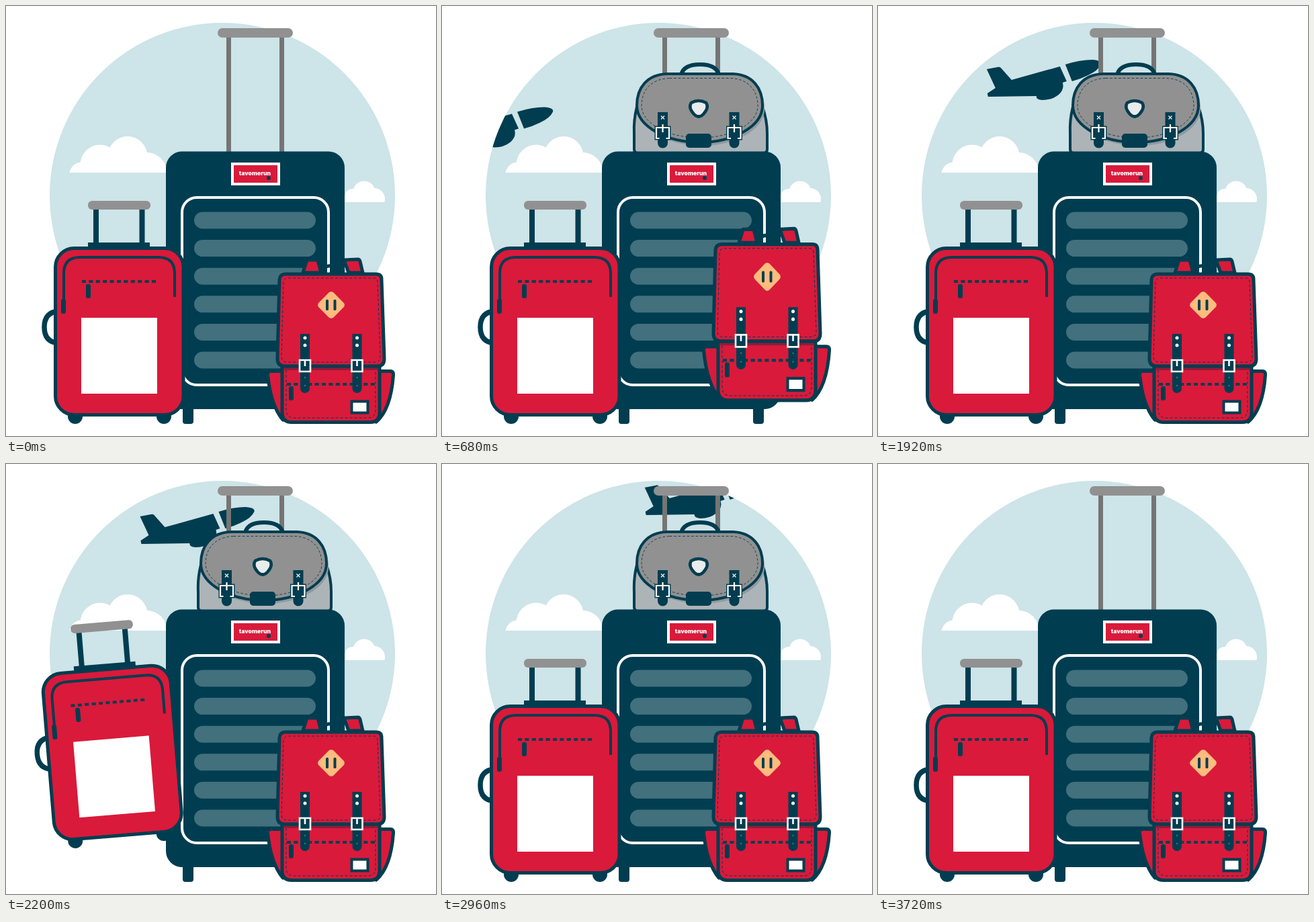
An HTML page that plays this animation: 640 by 640 pixels, repeating every 4 s.

```html
<!DOCTYPE html>
<html lang="en">
<head>
<meta charset="utf-8">
<title>Luggage</title>
<style>
  html, body { margin: 0; width: 100%; height: 100%; overflow: hidden; background: #fff; }
  svg { display: block; width: 100%; height: 100%; }
  .navy { fill: #003d50; }
  .red { fill: #d91a3b; }
  .white { fill: #fff; }
  .line { fill: none; stroke: #003d50; }
  .edge { stroke: #003d50; stroke-width: 5; stroke-linejoin: round; }
  .stitch { fill: none; stroke: #003d50; stroke-width: 1; stroke-dasharray: 4 3; }
  .zip { fill: none; stroke: #003d50; stroke-width: 4; stroke-dasharray: 6 4.4; }
  .buckle { fill: none; stroke: #fff; stroke-width: 2.6; }
</style>
</head>
<body>
<svg viewBox="0 0 640 640" xmlns="http://www.w3.org/2000/svg">
  <defs>
    <clipPath id="sky"><circle cx="322" cy="282" r="257"/></clipPath>
    <clipPath id="cloudL"><rect x="90" y="180" width="160" height="68"/></clipPath>
    <clipPath id="cloudR"><rect x="490" y="250" width="80" height="42"/></clipPath>
    <path id="flap" d="M335 101H433C462 102 477 122 477 148C477 180 432 203 384 203C336 203 290 180 290 148C290 122 305 102 335 101Z"/>
    <g id="packStrap">
      <path class="navy" d="M-7 488H7V569A7 7 0 0 1 -7 569Z"/>
      <circle class="white" cy="494" r="2.5"/>
      <circle class="white" cy="505" r="2.5"/>
      <circle cy="553" r="1.2" fill="#42707d"/>
      <circle cy="565" r="1.2" fill="#42707d"/>
      <path class="buckle" d="M-8 527H8V544H-8ZM0 526V536"/>
    </g>
    <g id="bagStrap">
      <path class="navy" d="M-7.5 158H7.5V204A7.5 7.5 0 0 1 -7.5 204Z"/>
      <path d="M-2.5 163.5L2.5 168.5M2.5 163.5L-2.5 168.5" stroke="#fff" stroke-width="1.2"/>
      <path d="M-5 197H-9.5V181H9.5V197H5" fill="none" stroke="#003d50" stroke-width="5"/>
      <path class="buckle" style="stroke-width:2.2" d="M-5 197H-9.5V181H9.5V197H5M0 176V188"/>
    </g>
  </defs>

  <circle cx="322" cy="282" r="257" fill="#cde4e8"/>
  <g class="white" clip-path="url(#cloudL)">
    <circle cx="114" cy="252" r="20"/>
    <circle cx="140" cy="236" r="29.5"/>
    <circle cx="181" cy="223.5" r="29.5"/>
    <circle cx="209" cy="249" r="31"/>
    <rect x="112" y="234" width="100" height="14"/>
  </g>
  <g class="white" clip-path="url(#cloudR)">
    <circle cx="516" cy="284" r="12"/>
    <circle cx="533" cy="277" r="16.5"/>
    <circle cx="548" cy="287" r="16"/>
    <rect x="500" y="284" width="50" height="8"/>
  </g>

  <g clip-path="url(#sky)">
    <g id="plane" class="navy">
      <path d="M161 94L177 91Q180 90 182 92L198 110L270 90L280 112L274 114Q277 124 268 132Q258 140 244 140Q234 139 235 134L163 135L162 130L174 122Z"/>
      <path d="M278 87Q300 80 318 80Q333 81 331 87Q327 96 312 103Q300 109 288 112Z"/>
    </g>
  </g>

  <g fill="#757575">
    <rect x="328" y="42" width="7" height="180"/>
    <rect x="407" y="42" width="7" height="180"/>
  </g>
  <rect x="315" y="33" width="112" height="14" rx="7" fill="#919191"/>

  <g id="bag">
    <path d="M290 150Q285 170 286 190V213Q286 219 292 219H478Q484 219 484 213V190Q484 170 477 150Z" fill="#acb4b8" stroke="#003d50" stroke-width="4"/>
    <use href="#flap" transform="translate(3 5)" fill="#8f9aa0"/>
    <path class="line" d="M356 102Q360 87 384 87Q408 87 412 102" stroke-width="6"/>
    <use href="#flap" fill="#919191" stroke="#003d50" stroke-width="4"/>
    <use href="#flap" class="stitch" transform="translate(384 151) scale(.925 .87) translate(-384 -151)"/>
    <path d="M371 144Q382 138 393 144Q398 151 389 161Q382 168 375 161Q366 151 371 144Z" fill="#e9ecec" stroke="#003d50" stroke-width="4.5" stroke-linejoin="round"/>
    <use href="#bagStrap" x="328.5"/>
    <use href="#bagStrap" x="435"/>
    <rect class="navy" x="363" y="190" width="38" height="21" rx="5"/>
  </g>

  <g class="navy">
    <rect x="263" y="590" width="16" height="32" rx="4"/>
    <rect x="463" y="590" width="16" height="32" rx="4"/>
    <rect x="238" y="216.5" width="266" height="383.5" rx="24"/>
  </g>
  <rect x="262" y="285" width="218" height="279" rx="22" fill="none" stroke="#fff" stroke-width="4"/>
  <g id="slats" fill="#42707d"></g>
  <rect class="white" x="335" y="233" width="73" height="34"/>
  <rect class="red" x="339" y="237" width="65" height="26"/>
  <text class="white" x="370.5" y="251.5" text-anchor="middle" font-family="Inter, sans-serif" font-weight="900" font-size="8.6">tavomerun</text>
  <circle class="navy" cx="391" cy="256" r="3"/>

  <g id="trolley">
    <path class="line" d="M78 454Q57 456 57 478Q57 500 78 502" stroke-width="7.5"/>
    <g class="navy">
      <circle cx="103" cy="611" r="11"/>
      <circle cx="235" cy="611" r="11"/>
      <rect x="130" y="298" width="8" height="60"/>
      <rect x="198.5" y="298" width="8" height="60"/>
      <rect x="122" y="352" width="92" height="10"/>
    </g>
    <rect x="122" y="290" width="93" height="13" rx="6" fill="#919191"/>
    <rect class="red edge" x="73.5" y="360.5" width="190.5" height="248" rx="28"/>
    <path class="line" d="M86 438V398Q86 374 110 374H227Q251 374 251 398V433" stroke-width="4"/>
    <path class="zip" d="M113 410H224"/>
    <g class="navy">
      <rect x="82" y="436" width="7" height="22" rx="3"/>
      <rect x="119" y="414" width="7" height="21" rx="3"/>
    </g>
    <rect class="white" x="112" y="464" width="113" height="113"/>
  </g>

  <g id="pack">
    <path class="red edge" d="M412 543.5H394Q389 543.5 389.5 549Q394 594 412 616Z"/>
    <path class="red edge" d="M555 543.5H572Q577 543.5 576.5 549Q573 600 551 619Z"/>
    <path class="line" d="M466 395Q484 378 503 395" stroke-width="5"/>
    <path class="red edge" d="M448 378H464L469 397H442Z"/>
    <path class="red edge" d="M503 378L524 377Q526 377 527 380L531 397H510Z"/>
    <path class="red edge" d="M411 525H556V605Q556 619.5 542 619.5H425Q411 619.5 411 605Z"/>
    <rect x="413" y="537" width="141" height="5" fill="#8f1c3a"/>
    <path class="stitch" d="M417 542V601Q417 613 429 613H538Q550 613 550 601V542"/>
    <path class="zip" d="M418 563H550"/>
    <rect class="navy" x="421" y="566" width="7" height="21" rx="3"/>
    <rect x="514.5" y="588.5" width="24" height="17" fill="#fff" stroke="#003d50" stroke-width="4"/>
    <path class="red edge" d="M416 399H551Q559 399 559 407L563 525Q563 536 553 536H415Q404 536 404 525L407 407Q408 399 416 399Z"/>
    <path class="stitch" d="M420 405H547Q553 405 553 411L557 522Q557 530 549 530H419Q410 530 410 522L413 411Q414 405 420 405Z"/>
    <rect x="468.5" y="429.5" width="31" height="31" rx="5" fill="#ffbc7d" transform="rotate(45 484 445)"/>
    <rect class="navy" x="476" y="437" width="4" height="16" rx="1.5"/>
    <rect class="navy" x="487.5" y="437" width="4" height="16" rx="1.5"/>
    <use href="#packStrap" x="445"/>
    <use href="#packStrap" x="522.5"/>
  </g>
</svg>
<script>
  const LOOP = 4000, STEP = 40, HOP = 480, REPEAT = 1960;
  const el = id => document.getElementById(id);
  const plane = el('plane'), bag = el('bag'), trolley = el('trolley'), pack = el('pack');

  el('slats').innerHTML = Array.from({ length: 6 }, (_, i) =>
    `<rect x="280" y="${306.5 + i * 41.6}" width="181" height="25" rx="12.5"/>`).join('');

  const clamp = u => Math.min(1, Math.max(0, u));
  const smooth = u => u * u * (3 - 2 * u);
  const ease = (t, from, to) => smooth(clamp((t - from) / (to - from)));
  const arc = u => 4 * u * (1 - u);

  // Progress of a jump that happens twice per loop
  function hop(t, start) {
    const u = (t - start) / HOP, v = (t - start - REPEAT) / HOP;
    return clamp(v > 0 ? v : u < 1 ? u : 0);
  }

  function tilt(u) {
    return -7.6 * (u < 0.7 ? (u / 0.7) ** 1.4 : 1 - smooth((u - 0.7) / 0.3));
  }

  function stretch(u) {
    if (u < 0.17) return 1 + 0.07 * smooth(u / 0.17);
    if (u < 0.6) return 1.07 - 0.017 * (u - 0.17) / 0.43;
    return 1 + 0.053 * (1 - smooth((u - 0.6) / 0.4));
  }

  const move = (node, value) => node.setAttribute('transform', value);

  function draw(t) {
    const dt = t - 1920;
    move(plane, `translate(${dt * 0.1345 + 0.8} ${-dt * 0.0568})`);

    const drop = ease(t, 0, 428) - ease(t, 3360, 3720);
    move(bag, `translate(0 ${-222 * (1 - drop)})`);

    const a = hop(t, 0);
    move(trolley, `translate(0 ${-55.5 * arc(a)}) rotate(${tilt(a)} 169 611)`);

    const b = hop(t, 400);
    move(pack, `translate(0 ${621 - 33.5 * arc(b)}) scale(1 ${stretch(b)}) translate(0 -621)`);
  }

  const start = performance.now();
  function tick() {
    const t = (performance.now() - start) % LOOP;
    draw(Math.floor(t / STEP) * STEP);
    requestAnimationFrame(tick);
  }
  draw(0);
  requestAnimationFrame(tick);
</script>
</body>
</html>
```
